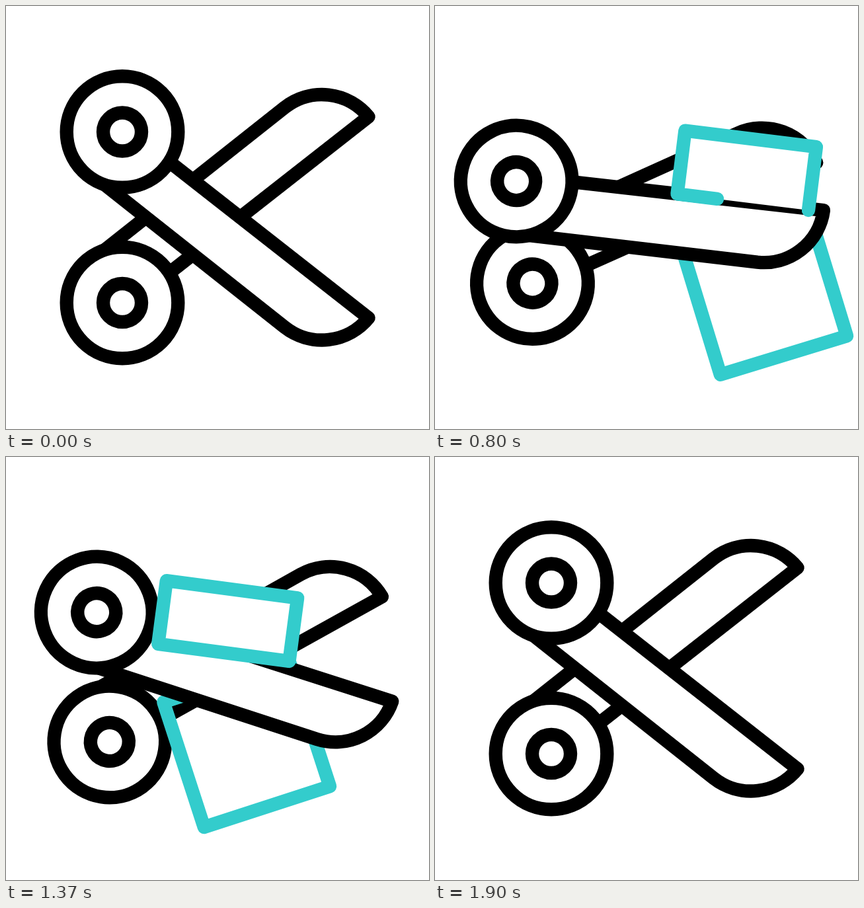
Write an HTML page with a canvas that moves like this. It is 640 px wide and 640 px high and loops after 2500 ms.

```html
<!DOCTYPE html>
<html lang="en">
<head>
<meta charset="utf-8">
<title>Scissors</title>
<style>
html, body { margin: 0; width: 100%; height: 100%; overflow: hidden; background: #fff; }
canvas { display: block; width: 100vmin; height: 100vmin; }
</style>
</head>
<body>
<canvas id="stage" width="640" height="640"></canvas>
<script>
const ctx = document.getElementById('stage').getContext('2d');
const LOOP = 2500, RATE = 0.03;
const LINE = 20.4, CYAN = '#33cccc';
const RAD = Math.PI / 180;

const clamp = v => Math.min(1, Math.max(0, v));
const ramp = (n, from, to) => clamp((n - from) / (to - from));
const smooth = u => u * u * (3 - 2 * u);
const ease = (n, from, to) => smooth(ramp(n, from, to));

// Two snips; angle in degrees.
function snipAngle(n) {
  const first = ease(n, 13, 25) - ease(n, 25, 32.7);
  const second = ease(n, 33.9, 46) - ease(n, 46, 57);
  return 32.3 * (first + second);
}

function circle(x, y, r, filled) {
  ctx.beginPath();
  ctx.arc(x, y, r, 0, 2 * Math.PI);
  if (filled) ctx.fill();
  ctx.stroke();
}

function drawBlade(angle, mirrored) {
  ctx.save();
  if (mirrored) {
    ctx.translate(0, 639.5);
    ctx.scale(1, -1);
  }
  ctx.translate(281, 321);
  ctx.rotate(-angle * RAD);
  ctx.translate(-281, -321);
  ctx.strokeStyle = '#000';
  ctx.fillStyle = '#fff';

  ctx.beginPath();
  ctx.moveTo(149.5, 270.5);
  ctx.lineTo(422, 486.2);
  ctx.arc(478, 414.6, 90.9, 128 * RAD, 39.1 * RAD, true);
  ctx.lineTo(247, 235.6);
  ctx.fill();
  ctx.stroke();

  circle(176, 190.5, 84.3, true);
  circle(176, 190.5, 29, false);
  ctx.restore();
}

// A sheet half hangs on its hinge; the cut edge is drawn from the far side.
function drawSheet({ x, y, angle, height, cut, alpha, filled }) {
  if (alpha <= 0) return;
  ctx.save();
  ctx.globalAlpha = alpha;
  ctx.translate(x, y);
  ctx.rotate(angle * RAD);
  ctx.strokeStyle = CYAN;
  ctx.fillStyle = '#fff';
  ctx.beginPath();
  ctx.moveTo(0, 0);
  ctx.lineTo(0, height);
  ctx.lineTo(-200, height);
  ctx.lineTo(-200, 0);
  if (cut > 0) ctx.lineTo(-200 * (1 - cut), 0);
  if (filled) ctx.fill();
  ctx.stroke();
  ctx.restore();
}

function draw(n) {
  ctx.fillStyle = '#fff';
  ctx.fillRect(0, 0, 640, 640);
  ctx.lineWidth = LINE;
  ctx.lineCap = ctx.lineJoin = 'round';

  const angle = snipAngle(n);
  const enter = ramp(n, 9, 15);
  const bend = smooth(Math.pow(ramp(n, 13, 25), 1.8));
  const cut = ease(n, 13, 43);
  const part = ease(n, 41, 51);
  const slide = end => 8.875 * Math.max(0, Math.min(n, end) - 25.62);
  const hingeY = 309 + 174 * (1 - enter);

  const upper = {
    x: 565 - slide(51),
    y: hingeY - 110 * part,
    angle: 7.5 * bend,
    height: -96.5,
    cut,
    alpha: enter * (1 - ramp(n, 46.5, 50)),
    filled: true
  };
  const lower = {
    x: 565 - slide(41),
    y: hingeY + 113 * part,
    angle: -18 * bend - 19 * part,
    height: 199,
    cut,
    alpha: enter * (1 - ramp(n, 43.5, 48.5)),
    filled: false
  };

  drawBlade(angle * 0.444, true);
  drawSheet(lower);
  if (n < 15) drawSheet(upper);
  drawBlade(angle, false);
  if (n >= 15) drawSheet(upper);
}

const start = performance.now();
function tick() {
  const time = (performance.now() - start) % LOOP;
  draw(Math.floor((time + 4) * RATE));
  requestAnimationFrame(tick);
}
tick();
</script>
</body>
</html>
```
